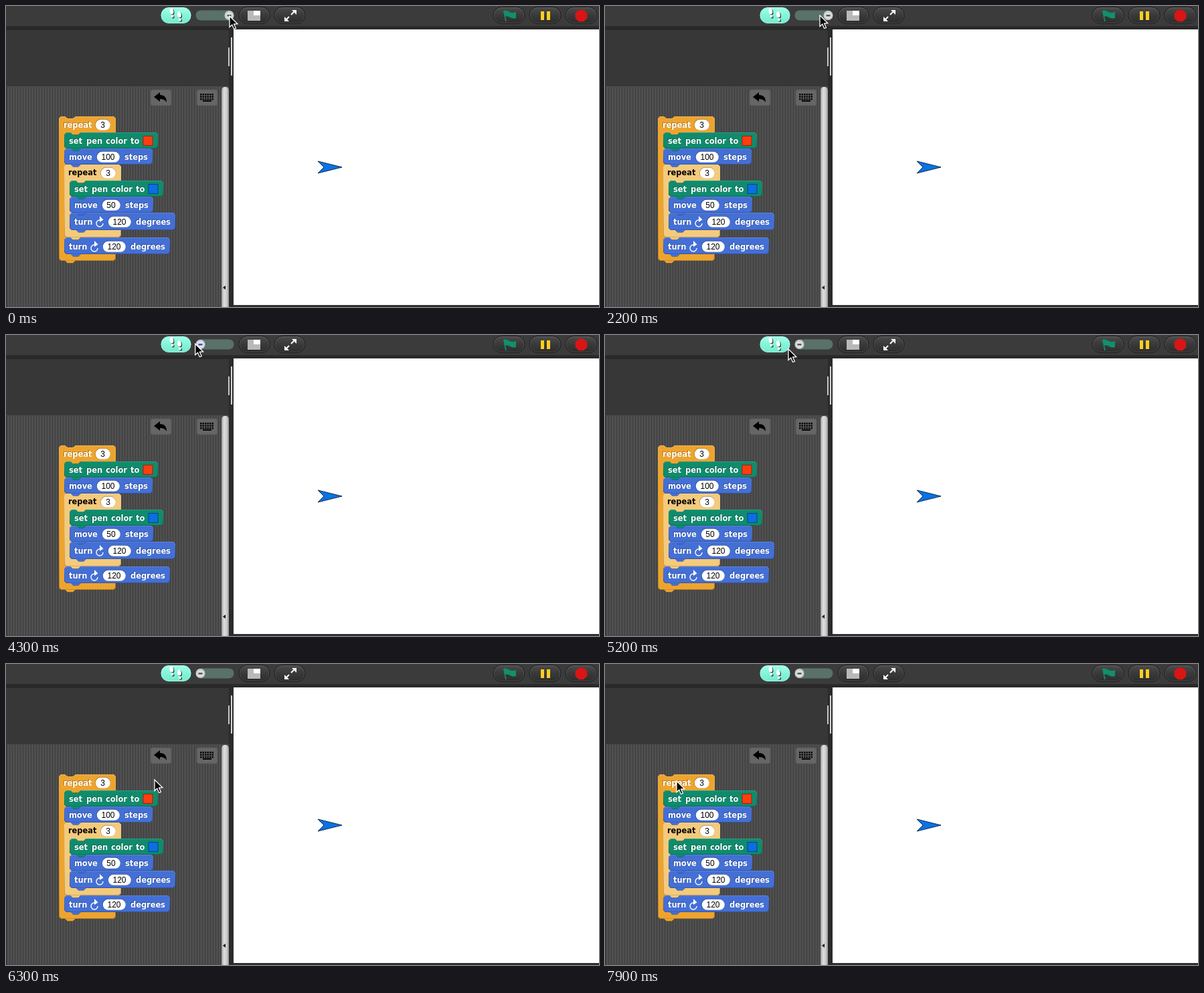
Animation of 886x450 px, one loop 8000 ms. Source, as an HTML page with a canvas:

```html
<!DOCTYPE html>
<html lang="en">
<head>
<meta charset="utf-8">
<title>Block editor</title>
<style>
html, body { margin: 0; width: 100%; height: 100%; overflow: hidden; background: #2b2b2b; }
canvas { display: block; }
</style>
</head>
<body>
<canvas id="stage" width="886" height="450"></canvas>
<script>
const W = 886, H = 450, LOOP = 8000, STEP = 100;
const view = document.getElementById('stage').getContext('2d');
const still = document.createElement('canvas');
still.width = W;
still.height = H;
let c = still.getContext('2d');

const ORANGE = '#eda42f', PALE = '#f4ca7c', GREEN = '#0f8c6d', BLUE = '#446fd5';
const LABEL = 'bold 11.4px "DejaVu Sans", sans-serif';
const NUMBER = '12px "Liberation Sans", Arial, sans-serif';

// time, x, y of the pointer tip
const pointerKeys = [
  [0, 334, 15], [600, 334, 14], [1300, 335, 8], [1700, 333, 9], [2200, 321, 14],
  [2700, 326, 12], [3100, 326, 12], [3400, 314, 12], [4200, 283, 13],
  [4600, 282, 14], [5200, 274, 21], [5500, 270, 34], [6300, 222, 173],
  [6800, 180, 183], [7500, 112, 177], [7900, 107, 175]
];
const knobKeys = [[0, 333.5], [3100, 333.5], [3400, 321], [4200, 290.5], [8000, 290.5]];

function rect(x, y, w, h, fill) {
  c.fillStyle = fill;
  c.fillRect(x, y, w, h);
}

function poly(points, fill, stroke, width = 1) {
  c.beginPath();
  points.forEach(([x, y]) => c.lineTo(x, y));
  c.closePath();
  if (fill) { c.fillStyle = fill; c.fill(); }
  if (stroke) { c.strokeStyle = stroke; c.lineWidth = width; c.stroke(); }
}

function round(x, y, w, h, r, fill, stroke) {
  c.beginPath();
  c.roundRect(x, y, w, h, r);
  c.fillStyle = fill;
  c.fill();
  if (stroke) { c.strokeStyle = stroke; c.lineWidth = 1; c.stroke(); }
}

function disc(x, y, r, fill) {
  c.beginPath();
  c.arc(x, y, r, 0, Math.PI * 2);
  c.fillStyle = fill;
  c.fill();
}

function fade(x0, y0, x1, y1, ...stops) {
  const g = c.createLinearGradient(x0, y0, x1, y1);
  stops.forEach((s, i) => g.addColorStop(i / (stops.length - 1), s));
  return g;
}

function word(text, x, y, fill = '#fff') {
  c.font = LABEL;
  if (fill === '#fff') {
    c.fillStyle = 'rgba(0,0,0,.28)';
    c.fillText(text, x - 1, y - 1);
  }
  c.fillStyle = fill;
  c.fillText(text, x, y);
}

function slot(text, x, y, w) {
  round(x, y, w, 17, 8.5, 'rgba(0,0,0,.3)');
  round(x + .7, y + .8, w - .9, 16, 8, '#fff');
  c.font = NUMBER;
  c.fillStyle = '#000';
  c.textAlign = 'center';
  c.fillText(text, x + w / 2, y + 13);
  c.textAlign = 'left';
}

function swatch(x, y, fill) {
  rect(x, y, 15, 15, fill);
  c.lineWidth = 1;
  c.strokeStyle = 'rgba(0,0,0,.4)';
  c.strokeRect(x + .5, y + .5, 14, 14);
}

function tab(x, y, fill) {
  poly([[x + 9, y - .5], [x + 13, y + 3.5], [x + 21, y + 3.5], [x + 25, y - .5]], fill);
  c.strokeStyle = 'rgba(0,0,0,.22)';
  c.lineWidth = 1;
  c.beginPath();
  c.moveTo(x + 13, y + 3.5);
  c.lineTo(x + 21, y + 3.5);
  c.lineTo(x + 25, y);
  c.stroke();
}

function block(x, y, w, h, fill, notch) {
  const r = 3;
  c.save();
  c.beginPath();
  c.moveTo(x, y + r);
  c.lineTo(x + r, y);
  if (notch) {
    c.lineTo(x + 9, y);
    c.lineTo(x + 13, y + 3);
    c.lineTo(x + 21, y + 3);
    c.lineTo(x + 25, y);
  }
  c.lineTo(x + w - r, y);
  c.lineTo(x + w, y + r);
  c.lineTo(x + w, y + h - r);
  c.lineTo(x + w - r, y + h);
  c.lineTo(x + r, y + h);
  c.lineTo(x, y + h - r);
  c.closePath();
  c.fillStyle = fill;
  c.fill();
  c.clip();
  c.lineWidth = 2;
  c.strokeStyle = fade(0, y, 0, y + h, 'rgba(255,255,255,.15)', 'rgba(0,0,0,.05)', 'rgba(0,0,0,.25)');
  c.stroke();
  c.restore();
}

function turnIcon(x, y) {
  c.strokeStyle = '#fff';
  c.lineWidth = 1.4;
  c.beginPath();
  c.arc(x, y, 5, 0, Math.PI * 1.5);
  c.stroke();
  poly([[x, y - 11], [x + 5.5, y - 5.5], [x, y - 2]], '#fff');
}

function pill(x, w, dark = true) {
  const fill = dark ? fade(0, 2, 0, 26, '#4c4c4c', '#393939', '#2d2d2d')
                    : fade(0, 2, 0, 26, '#a4ffe9', '#83f5d9', '#78e9ce');
  round(x, 1.5, w, 25, 12.5, fill, dark ? '#191919' : '#2a4a43');
  c.strokeStyle = dark ? 'rgba(255,255,255,.13)' : 'rgba(255,255,255,.35)';
  c.beginPath();
  c.roundRect(x + 1, 2.5, w - 2, 23, 11.5);
  c.stroke();
}

function foot(x, y) {
  for (const [d, fill] of [[1, '#0b1f1a'], [0, '#fff']]) {
    c.beginPath();
    c.ellipse(x + d, y - 3 + d, 2.8, 4.6, -.15, 0, 7);
    c.fillStyle = fill;
    c.fill();
    c.beginPath();
    c.ellipse(x + 1 + d, y + 4.4 + d, 2, 2.2, 0, 0, 7);
    c.fill();
  }
}

function toolbar() {
  rect(0, 0, W, 30, '#3b3b3b');
  rect(0, 30, W, 6, '#292929');
  pill(231, 46, false);
  foot(247.5, 11);
  foot(259, 16);
  pill(348, 46);
  rect(361, 7, 19, 15, '#b9b9b9');
  rect(370, 7, 10, 7, '#fff');
  pill(401, 46);
  c.strokeStyle = '#fff';
  c.lineWidth = 2;
  c.beginPath();
  c.moveTo(419, 20); c.lineTo(423, 16);
  c.moveTo(426, 13); c.lineTo(430, 9);
  c.stroke();
  poly([[434, 6], [434, 13], [427, 6]], '#fff');
  poly([[416, 23], [416, 16], [423, 23]], '#fff');
  pill(728, 47);
  c.beginPath();
  c.moveTo(743, 7);
  c.bezierCurveTo(749, 4, 753, 13, 762, 9);
  c.lineTo(762, 18);
  c.bezierCurveTo(754, 21, 751, 13, 746, 16);
  c.lineTo(748, 23);
  c.lineTo(746, 23);
  c.closePath();
  c.fillStyle = '#10906c';
  c.fill();
  pill(782, 47);
  rect(799, 8, 5, 13, '#fdce21');
  rect(808, 8, 5, 13, '#fdce21');
  pill(836, 47);
  const ring = Array.from({ length: 8 }, (_, i) => {
    const a = (i + .5) * Math.PI / 4;
    return [859.5 + 9.6 * Math.cos(a), 14.5 + 9.6 * Math.sin(a)];
  });
  poly(ring, '#d91515');
}

function panes() {
  rect(0, 36, 334, 85, '#373737');
  rect(0, 120, 334, 330, '#4c4c4c');
  for (let x = 1; x < 322; x += 4) {
    rect(x, 121, 1, 329, '#404040');
    rect(x + 2, 121, 1, 329, '#525252');
  }
  rect(0, 120, 1, 330, '#333');
  rect(333, 36, 8, 414, '#2b2b2b');
  rect(332, 62, 2, 28, '#c8c8c8');
  rect(336, 47, 2, 57, '#d4d4d4');
  round(322, 121, 11, 340, 5, fade(322, 0, 333, 0, '#999', '#dedede', '#d0d0d0', '#999'));
  poly([[324, 421], [328, 418], [328, 424]], '#111');
  rect(340, 35, 546, 412, '#fff');
  rect(340, 447, 546, 3, '#303030');

  for (const x of [216, 285]) round(x, 125, 31, 24, 3, '#666', '#555');
  c.beginPath();
  c.moveTo(221, 136);
  c.lineTo(230, 129);
  c.lineTo(230, 133);
  c.quadraticCurveTo(240, 133, 240, 144);
  c.quadraticCurveTo(237, 139, 230, 139);
  c.lineTo(230, 143);
  c.closePath();
  c.fillStyle = '#000';
  c.fill();
  for (let row = 0; row < 3; row++)
    for (let i = 0; i < 6; i++) rect(290 + i * 3.5, 131 + row * 3.5, 2.5, 2.5, '#080808');
  rect(294, 141, 13, 2, '#080808');
}

function script() {
  block(79, 165, 85, 216, ORANGE, true);
  tab(79, 381, ORANGE);
  block(87, 346, 158, 25, BLUE);
  tab(87, 371, BLUE);
  block(87, 237, 85, 109, PALE);
  tab(87, 346, PALE);
  block(95, 309, 158, 26, BLUE);
  tab(95, 335, BLUE);
  block(95, 285, 125, 24, BLUE);
  tab(95, 309, BLUE);
  block(95, 261, 140, 24, GREEN);
  tab(95, 285, GREEN);
  tab(95, 261, PALE);
  block(87, 213, 132, 24, BLUE);
  tab(87, 237, BLUE);
  block(87, 189, 140, 24, GREEN);
  tab(87, 213, GREEN);
  tab(87, 189, ORANGE);

  word('repeat', 86, 182);
  slot('3', 133, 169, 23);
  word('repeat', 93, 253, '#000');
  slot('3', 141, 241, 23);
  for (const [dx, y, ink] of [[0, 206, '#fc3d10'], [8, 278, '#0a6fe2']]) {
    word('set', 94 + dx, y);
    word('pen', 120 + dx, y);
    word('color', 149 + dx, y);
    word('to', 186 + dx, y);
    swatch(204.5 + dx, y - 12, ink);
  }
  word('move', 94, 230);
  slot('100', 135, 217, 35);
  word('steps', 177, 230);
  word('move', 102, 302);
  slot('50', 143, 289, 28);
  word('steps', 178, 302);
  for (const [dx, y] of [[8, 327], [0, 364]]) {
    word('turn', 94 + dx, y);
    turnIcon(132 + dx, y - 2);
    slot('120', 144 + dx, y - 13, 35);
    word('degrees', 186 + dx, y);
  }
}

function at(keys, t) {
  const i = keys.findIndex(k => k[0] > t);
  if (i < 0) return keys[keys.length - 1].slice(1);
  const a = keys[i - 1], b = keys[i];
  const p = (t - a[0]) / (b[0] - a[0]);
  return a.slice(1).map((v, j) => v + (b[j + 1] - v) * p);
}

function slider(x, held) {
  round(283, 6, 58, 16, 8, '#5a716a', '#34403c');
  disc(x, 14, 7, held ? '#c9cdec' : '#c9cdca');
  disc(x, 14.5, 5, held ? '#dfe2f8' : '#dddedd');
  rect(x - 3, 13, 6, 2.5, '#555');
}

function pointer(x, y) {
  const shape = [[0, 0], [0, 16.5], [3.8, 13], [6.6, 19.5], [9.4, 18.3], [6.6, 12], [11.8, 11.7]];
  c.lineJoin = 'miter';
  poly(shape.map(([dx, dy]) => [x + dx, y + dy]), '#000', '#fff', 1.3);
}

toolbar();
panes();
script();
poly([[502, 241], [466, 232], [475, 241], [466, 250]], '#0a72e4', '#102b48');
c = view;

function draw(now) {
  const t = Math.floor(now % LOOP / STEP) * STEP;
  c.drawImage(still, 0, 0);
  slider(at(knobKeys, t)[0], t >= 2700 && t < 4500);
  pointer(...at(pointerKeys, t));
  requestAnimationFrame(draw);
}
requestAnimationFrame(draw);
</script>
</body>
</html>
```
